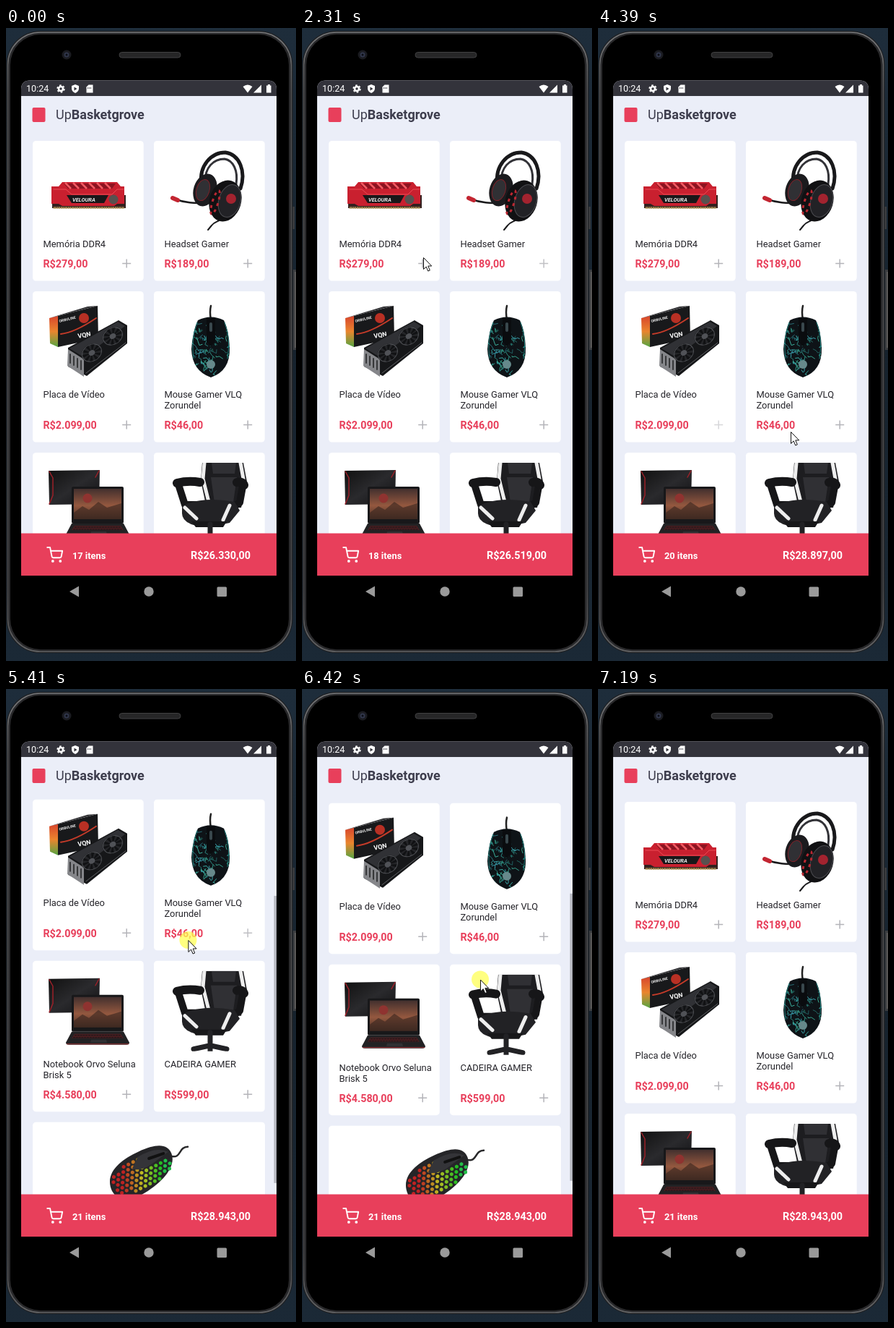
Write an HTML page that moves like this. It is 402 by 875 pixels and loops after 7.58 s.

```html
<!DOCTYPE html>
<html lang="pt">
<head>
<meta charset="utf-8">
<title>Loja</title>
<style>
html, body { margin: 0; width: 100%; height: 100%; overflow: hidden; background: #1b2935; }
svg { display: block; width: 402px; height: 875px; font-family: Roboto, sans-serif; }
.name { font-size: 12.9px; fill: #25242a; }
.price { font-size: 14.3px; font-weight: 700; fill: #e83f5b; }
.plus { stroke: #b4b4b9; stroke-width: 1.5; }
.line { fill: none; stroke-linecap: round; stroke-linejoin: round; }
</style>
</head>
<body>
<svg viewBox="0 0 402 875">
  <defs>
    <linearGradient id="backdrop" x2="0" y2="1">
      <stop stop-color="#1e2d3b"/><stop offset=".5" stop-color="#16222d"/><stop offset="1" stop-color="#1b2936"/>
    </linearGradient>
    <linearGradient id="rim" x2="0" y2="1">
      <stop stop-color="#77787a"/><stop offset=".1" stop-color="#505153"/><stop offset=".9" stop-color="#46474a"/><stop offset="1" stop-color="#626365"/>
    </linearGradient>
    <linearGradient id="sunset" x2="0" y2="1">
      <stop stop-color="#43302e"/><stop offset=".55" stop-color="#94583f"/><stop offset="1" stop-color="#4a3026"/>
    </linearGradient>
    <linearGradient id="boxside" x2="0" y2="1">
      <stop stop-color="#d8452c"/><stop offset=".5" stop-color="#e9852e"/><stop offset="1" stop-color="#55a543"/>
    </linearGradient>
    <linearGradient id="lid" x2="1" y2="1">
      <stop stop-color="#111"/><stop offset=".5" stop-color="#2a2a2d"/><stop offset="1" stop-color="#101012"/>
    </linearGradient>
    <clipPath id="view"><rect x="21" y="148" width="354" height="551"/></clipPath>
    <clipPath id="chairbox"><rect x="220" y="601" width="124" height="111"/></clipPath>
    <clipPath id="mousebody"><path id="shell" d="M266 404Q284 395 302 404Q309 418 310 442Q311 474 284 483Q258 474 257 444Q259 418 266 404Z"/></clipPath>
  </defs>

  <rect width="402" height="875" fill="url(#backdrop)"/>
  <path d="M398 247v31M400 334v111" stroke="#3b3d40" stroke-width="4"/>
  <path d="M401 337v105" stroke="#77736d"/>
  <rect x=".5" y="4" width="397" height="860" rx="47" fill="#1d1e20"/>
  <rect x="2.5" y="6" width="393" height="856" rx="45" fill="#29292b" stroke="url(#rim)" stroke-width="1.6"/>
  <rect x="6" y="9" width="386" height="850" rx="42" fill="#000"/>
  <circle cx="84" cy="37" r="6.5" fill="#1a1b20"/><circle cx="84" cy="37" r="3.5" fill="#30364a"/><circle cx="84" cy="37" r="1.5" fill="#0a0c13"/>
  <rect x="157" y="33.5" width="85" height="7.5" rx="3.7" fill="#262627" stroke="#414142"/>

  <path d="M21 757V85Q21 72.500 33 72.500H363Q375 72.500 375 85V757Z" fill="#ebeef8"/>
  <path d="M21 94V85Q21 72.500 33 72.500H363Q375 72.500 375 85V94Z" fill="#33333b"/>
  <text x="28" y="88.3" font-size="12.6" fill="#fff">10:24</text>
  <g fill="#fff">
    <circle cx="76" cy="84" r="3" fill="none" stroke="#fff" stroke-width="2.6"/>
    <circle cx="76" cy="84" r="4.9" fill="none" stroke="#fff" stroke-width="1.6" stroke-dasharray="2.6 2.53"/>
    <path d="M96 78l5 2v3.5q0 4-5 6.5q-5-2.500-5-6.500V80z"/>
    <path d="M94.500 81.500l4 2.500l-4 2.500z" fill="#33333b"/>
    <path d="M114.500 78.500h6v11h-9v-8z"/>
    <path d="M113.500 82v2m2-2v2m2-2v2" stroke="#33333b" stroke-width=".8"/>
    <path d="M328.500 81q6.500-5 13 0l-6.500 8.500z"/>
    <path d="M354 78.500v11h-11z"/>
    <path d="M361 79.500h2v-1.500h3v1.500h1.500v10H361z"/>
  </g>

  <rect x="36.5" y="110" width="18" height="20" rx="2" fill="#e83f5b"/>
  <text x="69" y="126" font-size="18" fill="#3d3d4d">Up<tspan font-weight="700">Basketgrove</tspan></text>

  <g clip-path="url(#view)">
    <g id="list"></g>
    <rect id="thumb" x="371.5" width="3.5" height="397" fill="#000"/>
  </g>

  <rect x="21" y="698.5" width="354" height="58.5" fill="#e83f5b"/>
  <g class="line" transform="translate(56.3 717) scale(.95)" stroke="#fff" stroke-width="2">
    <circle cx="9" cy="21" r="1"/><circle cx="20" cy="21" r="1"/>
    <path d="M1 1h4l2.680 13.390a2 2 0 0 0 2 1.610h9.720a2 2 0 0 0 2-1.610L23 6H6"/>
  </g>
  <g fill="#fff" font-weight="700">
    <text id="count" x="92" y="733.5" font-size="12.8"></text>
    <text id="total" x="256" y="734" font-size="14.4"></text>
  </g>
  <g fill="#9a9a9a">
    <path d="M88 779l13-7.500v15z"/><circle cx="198" cy="779" r="6.7"/><rect x="292.5" y="772.5" width="13.5" height="13.5" rx="1.5"/>
  </g>

  <circle id="press" r="12" fill="#ffff4f" opacity=".72"/>
  <path id="cursor" d="M.5.5V16.500L4.200 13L6.700 19L9.300 18L6.800 12H11.700Z" fill="#fff" stroke="#111"/>
</svg>

<script>
const $ = id => document.getElementById(id);
const LOOP = 7580, FIRST = 380, STEP = 77.2;

const clamp = u => Math.max(0, Math.min(1, u));
const ramp = (t, from, to) => clamp((t - from) / (to - from));
const smooth = (t, from, to) => { const u = ramp(t, from, to); return u * u * (3 - 2 * u); };
const repeat = (n, fn) => Array.from({ length: n }, (_, i) => fn(i)).join('');
const money = n => `R$${String(n).replace(/(?=\d{3}$)/, n > 999 ? '.' : '')},00`;

function seeded(seed) {
  return () => (seed = seed * 16807 % 2147483647) / 2147483647;
}

function cracks() {
  const rnd = seeded(41);
  return repeat(60, () => {
    const start = `M${258 + rnd() * 52} ${408 + rnd() * 70}`;
    const bends = repeat(3, () => `l${rnd() * 10 - 5} ${rnd() * 10 - 4}`);
    return `<path d="${start}${bends}" stroke="hsl(${165 + rnd() * 25} 50% ${24 + rnd() * 24}%)"/>`;
  });
}

function honeycomb() {
  return repeat(91, i => {
    const row = Math.floor(i / 13) - 3, col = i % 13 - 6;
    const x = col * 7.4 + (row & 1) * 3.7, y = row * 6.2;
    if (Math.hypot(x / 44, y / 23) > 1 || (x > 4 && y < -2)) return '';
    const hue = 135 * clamp((58 + x * 2.1 + y) / 135);
    return `<path d="M${x - 2.8} ${y}l1.400-2.400h2.800l1.400 2.400l-1.400 2.400h-2.800z" fill="hsl(${hue} 70% 44%)"/>`;
  });
}

const fan = (x, y) => `<g transform="translate(${x} ${y}) rotate(-32) scale(1 .8)">
  <circle r="15" fill="#242528"/><circle r="14" fill="none" stroke="#55575b"/>
  <circle r="9" fill="none" stroke="#111214" stroke-width="9" stroke-dasharray="3 2.7"/><circle r="4.5" fill="#505257"/></g>`;

const cup = (x, y, rx, ry, style) => `<ellipse rx="${rx}" ry="${ry}" transform="translate(${x} ${y}) rotate(17)" ${style}/>`;

const art = {
  memory: `<path d="M64 231h102v18H64z" fill="#34211f"/>
    <path d="M66 248.500h98" stroke="#b89a58" stroke-width="3" stroke-dasharray="1.5 1"/>
    <path d="M63 219h10l5-6h76l5 6h5v24h-10l-4 3H78l-5-3H63z" fill="#c9202f"/>
    <path d="M80 215h72l-5 7H86z" fill="#8d1421"/>
    <g stroke="#f25a62" stroke-width="2.5">${repeat(6, i => `<path d="M${82 + i * 11} 214l8 8"/>`)}</g>
    <path d="M66 223h17l8 7h56l7-7h9" class="line" stroke="#ed4b55"/>
    <path d="M84 231h58l-6 11H91z" fill="#191719"/>
    <text x="92" y="239.5" font-size="7.5" font-weight="700" font-style="italic" fill="#eee">VELOURA</text>
    <circle cx="149" cy="237" r="6.5" fill="#58514f"/>`,
  headset: `<g class="line" stroke="#19191b">
    <path d="M271 216C267 190 285 172 304 172C324 175 333 198 325 222" stroke-width="5"/>
    <path d="M276 212C276 193 287 181 303 181C315 183 322 197 319 216" stroke="#333338" stroke-width="3"/>
    <path d="M235 237Q256 244 281 241" stroke-width="2.5"/>
    <path d="M231 235l7 3" stroke="#c32531" stroke-width="6"/>
    <path d="M300 261c-4 8-10 5-15 12l-5 6" stroke-width="2"/></g>
    ${cup(276, 224, 16, 23, 'fill="#1b1b1e"')}${cup(273, 224, 9, 15, 'fill="#303034" stroke="#7c222a"')}
    ${cup(304, 239, 22, 29, 'fill="#111113"')}${cup(310, 239, 15, 23, 'fill="#222226" stroke="#4b4b50"')}
    ${cup(290, 241, 4, 17, 'fill="none" stroke="#bb2832" stroke-width="3" stroke-dasharray="4 5"')}
    <circle cx="312" cy="236" r="7" fill="#a3232f"/>`,
  gpu: `<path d="M60 401l12-3v43l-11-5z" fill="url(#boxside)"/>
    <path d="M72 398l55-14l1 45l-56 12z" fill="#18191b"/>
    <path d="M60 401l53-16l14-1l-55 14z" fill="#343437"/>
    <circle cx="108" cy="401" r="7" fill="#b83024"/>
    <path d="M76 423q19-2 49-22" class="line" stroke="#c53b29" stroke-width="2"/>
    <text transform="translate(74 407) rotate(-13)" font-size="5" font-weight="700" fill="#eee">ORBULINE</text>
    <text transform="translate(100 429) rotate(-10)" font-size="9" font-weight="700" fill="#fff">VQN</text>
    <path d="M116 428l8-2v7l-8 2z" fill="#69a83a"/>
    <path d="M86 442L156 404l12 7v25l-56 45l-26-13z" fill="#161719"/>
    <path d="M88 443l67-37l10 6l-57 43z" fill="#303135"/>
    <path d="M86 444l22 14v24l-23-15z" fill="#85868a"/>
    <g class="line" stroke="#363739" stroke-width="2">${repeat(4, i => `<path d="M${89 + i * 5} ${451 + i * 3}v12"/>`)}</g>
    <path d="M111 477l55-42" class="line" stroke="#5f6063"/>
    ${fan(119, 449)}${fan(148, 426)}`,
  mouse: `<path d="M284 384q-2 8 0 19" class="line" stroke="#222" stroke-width="2.5"/>
    <use href="#shell" fill="#0e1317"/>
    <g class="line" clip-path="url(#mousebody)">${cracks()}</g>
    <path d="M278 401h12v32l-6 7l-6-7z" fill="#0a0c0f"/><rect x="282" y="407" width="4" height="13" rx="2" fill="#39484d"/>
    <path d="M265 407q-9 23-5 50m43-50q9 23 4 50" class="line" stroke="#1f7a77"/>
    <circle cx="284" cy="465" r="6" fill="#66898b"/>`,
  laptop: `<path d="M59 612l71-1l-1 47l-69 1z" fill="url(#lid)"/>
    <path d="M60 613l5 9v24l-5 12m69-46l-5 9" class="line" stroke="#9c2028" stroke-width="1.5"/>
    <rect x="91" y="634" width="72" height="51" rx="2" fill="#18181a"/>
    <rect x="94" y="637" width="66" height="42" fill="url(#sunset)"/>
    <path d="M94 670l12-9l9 5l13-11l12 8l20-6v22H94z" fill="#38251f" opacity=".6"/>
    <circle cx="113" cy="650" r="6.5" fill="#8f3330"/>
    <path d="M91 685h72l8 15q0 3-4 3H87q-4 0-4-3z" fill="#222224"/>
    <path d="M95 688h64l4 6H91z" fill="#4a1d20"/>
    <path d="M95 690h64m-66 3h68" stroke="#171719" stroke-dasharray="3 .8"/>
    <path d="M118 696h21l1 4h-23z" fill="#303033"/><path d="M84 702h86" stroke="#9d3437"/>`,
  chair: `<g clip-path="url(#chairbox)">
    <path d="M272 601h57l5 26l-8 36h-48l-8-37z" fill="#1d1d20"/>
    <path d="M275 601l-2 22l9 36m43-58l4 22l-7 36" class="line" stroke="#eee" stroke-width="5"/>
    <path d="M285 601h34l-2 15h-30zM284 621h36l-5 35h-26z" fill="#303034"/>
    <g class="line" stroke="#161618">
      <path d="M240 634l8 25h25m55-25l-4 22l-12 8" stroke-width="10"/>
      <path d="M237 629q16-4 32-1m51 0q8-2 10 4" stroke-width="12"/>
    </g>
    <path d="M244 661q26-14 73-6l7 12l-14 17q-26 6-50 3q-16-5-16-16z" fill="#222225"/>
    <path d="M248 663l16 15m46-18l-9 20" class="line" stroke="#eee" stroke-width="5"/>
    <path d="M257 682h49l-5 8h-38z" fill="#171719"/>
    <path d="M283 686v18l-23 5m23-5l23 5m-23-5v8" class="line" stroke="#222225" stroke-width="7"/></g>`,
  hive: `<path d="M229 857c14 4 10-13 23-13" class="line" stroke="#29292b" stroke-width="2.5"/>
    <g transform="translate(188 880) rotate(-27)">
      <path d="M-48 4C-47-24-17-29 9-28C38-27 50-19 49-5C47 15 17 26-14 27C-37 27-47 20-48 4Z" fill="#252528"/>
      ${honeycomb()}
      <path d="M5-22q30-2 41 13l-30 5q-18 1-25-7z" fill="#343438"/><path d="M18-13l21 3" class="line" stroke="#111" stroke-width="4"/>
    </g>`
};

const products = {
  memory: { price: 279, name: ['Memória DDR4'] },
  headset: { price: 189, name: ['Headset Gamer'] },
  gpu: { price: 2099, name: ['Placa de Vídeo'] },
  mouse: { price: 46, name: ['Mouse Gamer VLQ', 'Zorundel'] },
  laptop: { price: 4580, name: ['Notebook Orvo Seluna', 'Brisk 5'] },
  chair: { price: 599, name: ['CADEIRA GAMER'] },
  hive: { price: 133, name: ['Mouse Gamer Zumel'] }
};

function card(key, x, y, w, h) {
  const { name, price } = products[key];
  return `<rect x="${x}" y="${y}" width="${w}" height="${h}" rx="4.5" fill="#fff"/>${art[key]}
    ${name.map((s, i) => `<text class="name" x="${x + 14.5}" y="${y + 147 + i * 15}">${s}</text>`).join('')}
    <text class="price" x="${x + 14.5}" y="${y + h - 18.5}">${money(price)}</text>
    <path id="plus-${key}" class="plus" d="M${x + w - 29.5} ${y + h - 24}h12m-6-6v12"/>`;
}

function layout() {
  const keys = Object.keys(products);
  let y = 156, out = '';
  for (let i = 0; i < keys.length; i += 2) {
    const row = keys.slice(i, i + 2);
    const h = 178.5 + 15 * Math.max(...row.map(k => products[k].name.length));
    const w = row.length > 1 ? 153.7 : 322;
    out += row.map((k, col) => card(k, 37 + col * 168, y, w, h)).join('');
    y += h + 14.5;
  }
  return out;
}
$('list').innerHTML = layout();

// the shop answers each tap with a delay
const taps = [
  { key: 'headset', at: 1380, added: 1925 },
  { key: 'memory', at: 2455, added: 3000 },
  { key: 'gpu', at: 3230, added: 4230 },
  { key: 'mouse', at: 4700, added: 5010 }
];
const drags = [[5170, 5475], [6030, 6710]];
const MAX_SCROLL = 326;

// pointer stops: time, x, y
const stops = [
  [380, 192, 768], [1080, 208, 490], [1385, 336, 330], [1540, 341, 325], [1700, 341, 325], [2310, 168, 317],
  [2620, 168, 317], [3090, 167, 560], [3460, 167, 560], [4390, 266, 558], [4700, 336, 551], [4940, 336, 552],
  [5170, 262, 560], [5550, 246, 205], [5720, 246, 205], [5870, 244, 217], [6050, 244, 217],
  [6401, 247, 401], [6710, 267, 696], [7110, 378, 852]
];

function pointer(t) {
  const i = Math.max(1, stops.findIndex(s => s[0] > t));
  const [t0, x0, y0] = stops[i - 1], [t1, x1, y1] = stops[i];
  const u = ramp(t, t0, t1);
  return `translate(${x0 + (x1 - x0) * u} ${y0 + (y1 - y0) * u})`;
}

const flash = (t, from, to) => 0.23 * Math.min(ramp(t, from, from + 80), 1 - ramp(t, to - 400, to));
const show = (id, on) => $(id).style.display = on ? '' : 'none';

function draw(now) {
  const time = now % LOOP;
  const step = Math.floor((time - FIRST + 6) / STEP);
  const t = step < 0 ? 0 : FIRST + step * STEP;

  const scroll = MAX_SCROLL * (smooth(t, 5170, 5550) - smooth(t, 6180, 6720));
  $('list').setAttribute('transform', `translate(0 ${-scroll})`);
  $('thumb').setAttribute('y', 148 + scroll * 397 / 608);
  $('thumb').setAttribute('opacity', flash(t, 850, 1720) + flash(t, 5090, 7110));

  let items = 17, sum = 26330;
  for (const { key, at, added } of taps) {
    const dim = ramp(t, at + 80, at + 240) - ramp(t, added, added + 500);
    $('plus-' + key).setAttribute('opacity', 1 - 0.7 * dim);
    if (t >= added) { items++; sum += products[key].price; }
  }
  $('count').textContent = `${items} itens`;
  $('total').textContent = money(sum);

  const pressed = taps.some(({ at }) => t >= at && t < at + 80) || drags.some(([a, b]) => t >= a && t < b);
  const visible = t >= FIRST && t < 7110;
  show('cursor', visible);
  show('press', pressed);
  if (visible) for (const id of ['cursor', 'press']) $(id).setAttribute('transform', pointer(t));
}

let start;
function frame(now) {
  start ??= now;
  draw(now - start);
  requestAnimationFrame(frame);
}
draw(0);
requestAnimationFrame(frame);
</script>
</body>
</html>
```
